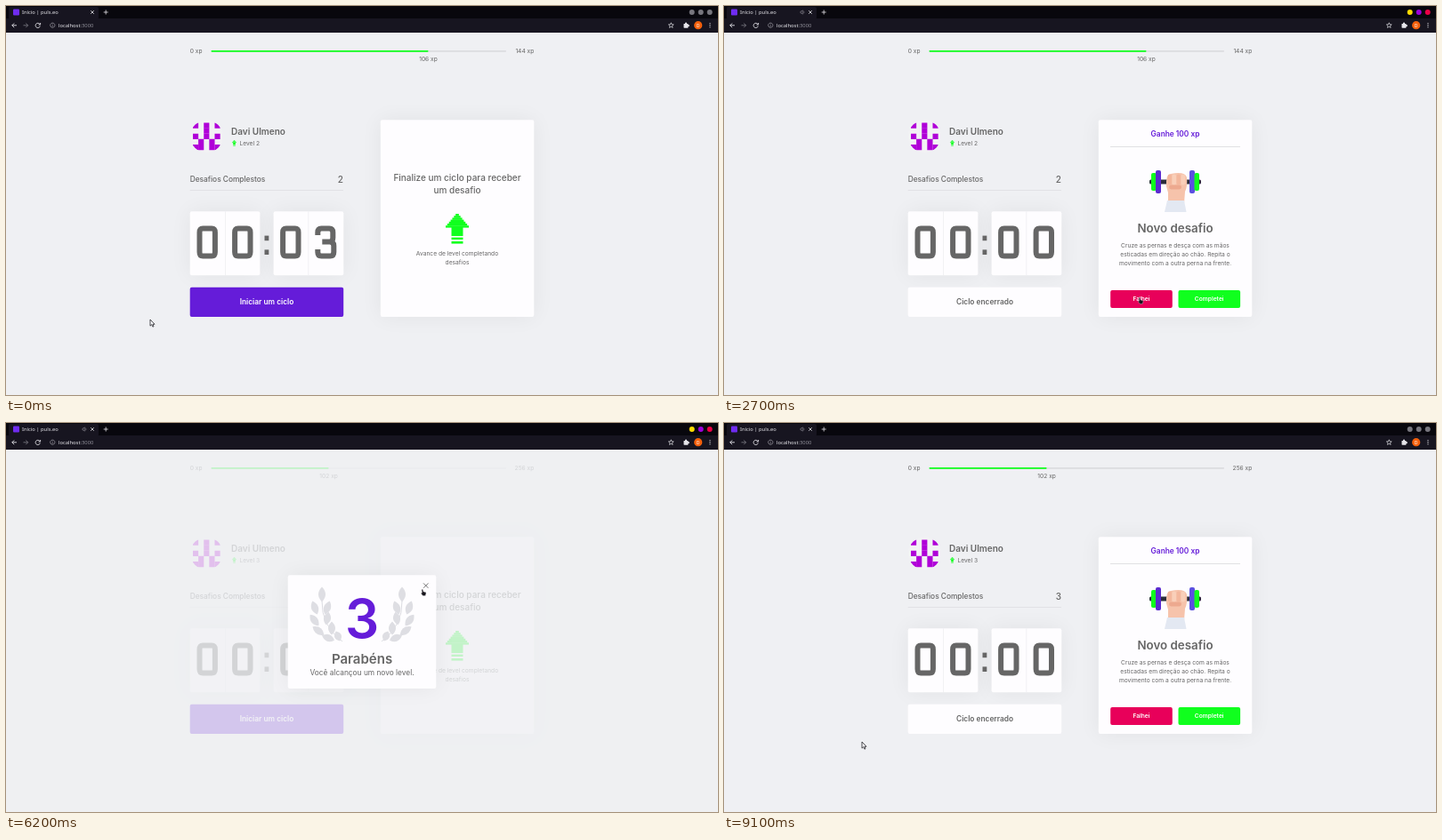
Recreate the animation shown at these times as an HTML page with a canvas. Size 800x438 px, loop 9.2 s.

```html
<!DOCTYPE html>
<html lang="pt-BR">
<head>
<meta charset="utf-8">
<title>Início | puls.eo</title>
<style>
html, body { margin: 0; width: 100%; height: 100%; overflow: hidden; background: #eff0f3; }
canvas { display: block; width: 800px; height: 438px; }
</style>
</head>
<body>
<canvas id="stage" width="800" height="438"></canvas>
<script>
const ctx = document.getElementById('stage').getContext('2d');
const LOOP = 9200, STEP = 100;
const PAGE = '#eff0f3', WHITE = '#fefdff', GREY = '#666666', GREEN = '#10ff1e';
const PURPLE = [101, 28, 217], DEEP = [80, 20, 190], RED = [232, 0, 90], PALE = [254, 253, 255];

// Each cycle: click on start, countdown changes, end of the challenge.
const cycles = [
  { click: 900, ticks: [1200, 1700, 2300], end: 2800, reward: 100 },
  { click: 3560, ticks: [4050, 4550, 5150], end: 5700, reward: 140 },
  { click: 7050, ticks: [7600, 8100, 8700], end: LOOP, reward: 100 }
];
const sounds = [[2500, 4300], [5400, 7700], [8900, LOOP]];
const path = [ // time, x, y of the pointer tip
  [0, 162, 353], [300, 162, 353], [800, 350, 327], [1500, 350, 327], [1700, 377, 319],
  [2100, 466, 328], [2800, 466, 328], [3300, 349, 325], [3700, 349, 325], [4300, 512, 328],
  [4800, 512, 328], [5100, 532, 328], [5500, 545, 327], [5800, 545, 327], [6200, 467, 187],
  [6700, 467, 187], [7000, 349, 330], [8200, 349, 330], [8800, 166, 356], [9100, 155, 359]
];

const rgb = c => `rgb(${c.map(Math.round).join()})`;
const mix = (a, b, k) => a.map((v, i) => v + (b[i] - v) * k);
const clamp = v => Math.max(0, Math.min(1, v));
const within = (t, [a, b]) => t >= a && t < b;

function rect(x, y, w, h, color, r = 0) {
  ctx.fillStyle = color;
  ctx.beginPath();
  ctx.roundRect(x, y, w, h, r);
  ctx.fill();
}
function circle(x, y, r, color) {
  ctx.fillStyle = color;
  ctx.beginPath();
  ctx.arc(x, y, r, 0, 7);
  ctx.fill();
}
function stroke(d, color, width) {
  ctx.strokeStyle = color;
  ctx.lineWidth = width;
  ctx.stroke(new Path2D(d));
}
function text(s, x, y, size, weight = 400, color = GREY, align = 'left', font = 'Inter') {
  ctx.font = `${weight} ${size}px ${font}, sans-serif`;
  ctx.fillStyle = color;
  ctx.textAlign = align;
  ctx.fillText(s, x, y + size * 0.36);
}
function panel(x, y, w, h) {
  ctx.save();
  ctx.shadowColor = 'rgba(0,0,0,.06)';
  ctx.shadowBlur = 25;
  rect(x, y, w, h, WHITE, 2);
  ctx.restore();
}

function browser(t) {
  const active = within(t, [900, 9000]);
  rect(0, 0, 800, 14, '#08070d');
  rect(3, 1, 101, 14, '#171520', 2);
  rect(0, 14, 800, 16, '#171520');
  rect(8, 3.5, 7, 7, '#6f2cf0', 1);
  text('Início | puls.eo', 18, 7, 5.8, 400, '#e6e5ea', 'left', '"Noto Sans"');
  if (sounds.some(s => within(t, s))) {
    stroke('M86 6h1l1.3-1.2v4.4L87 8h-1z M89.5 5.6q1 1.4 0 2.8', '#8d8c96', .6);
  }
  stroke('M95.2 5.2l3.6 3.6m0-3.6l-3.6 3.6 M109.7 7h5m-2.5-2.5v5', '#e6e5ea', .8);
  const dots = active ? ['#ffdc00', '#9c00dc', '#eb0046'] : ['#77767e', '#77767e', '#77767e'];
  dots.forEach((c, i) => circle(770.7 + i * 10, 7, 3, c));
  stroke('M12 21.8H6.8m2.4-2.4l-2.4 2.4 2.4 2.4', '#e6e5ea', .9);
  stroke('M19.5 21.8h5.2m-2.4-2.4l2.4 2.4-2.4 2.4', '#75747d', .9);
  stroke('M37.8 20.3a2.6 2.6 0 1 0 .5 2.2 M38.6 19v2h-2', '#e6e5ea', .9);
  stroke('M52.3 19.1a2.6 2.6 0 1 0 .01 0 M52.3 21.5v1.8m0-2.9v.5', '#b9b8c0', .6);
  text('localhost', 59, 21.7, 5.8, 400, '#ecebf0', 'left', '"Noto Sans"');
  text(':3000', 59 + ctx.measureText('localhost').width, 21.7, 5.8, 400, '#92919a', 'left', '"Noto Sans"');
  stroke('M747.3 18.8l.8 2 2.1.1-1.6 1.4.5 2.1-1.8-1.1-1.8 1.1.5-2.1-1.6-1.4 2.1-.1z', '#e6e5ea', .7);
  rect(761.5, 20, 5, 4.7, '#e6e5ea', .6);
  circle(764, 19.7, 1.1, '#e6e5ea');
  circle(766.8, 22.2, 1.1, '#e6e5ea');
  circle(777.7, 21.7, 4.6, '#f4600c');
  text('D', 777.7, 21.7, 5.2, 400, '#fff', 'center', 'Roboto');
  for (let i = -1; i < 2; i++) circle(791, 21.7 + i * 2.1, .65, '#e6e5ea');
}

function levelArrow(x, y, s) {
  for (let i = 0; i < 7; i++) rect(x - (i + 1) * 1.86 * s, y + i * 2.2 * s, (i + 1) * 3.72 * s, 2.4 * s, GREEN);
  rect(x - 6.5 * s, y + 15 * s, 13 * s, 10 * s, GREEN);
  rect(x - 6.5 * s, y + 26.6 * s, 13 * s, 2.4 * s, GREEN);
  rect(x - 6.5 * s, y + 31 * s, 13 * s, 2.6 * s, GREEN);
}

function profile(level, done) {
  ctx.save();
  ctx.beginPath();
  ctx.arc(225.3, 146.8, 18.3, 0, 7);
  ctx.clip();
  rect(206, 128, 39, 38, '#f2f2f4');
  ['10101', '00100', '10101', '01010', '11011'].forEach((row, j) =>
    [...row].forEach((on, i) => {
      if (+on) rect(210 + i * 6.12, 131.5 + j * 6.12, 6.15, 6.15, '#b000d8');
    }));
  ctx.restore();
  text('Davi Ulmeno', 253, 141.3, 10, 600);
  levelArrow(256.5, 151, .2);
  text('Level ' + level, 262.5, 155, 6.67);
  text('Desafios Complestos', 206.7, 195, 8.33, 500);
  text(done, 379, 195, 10, 500, GREY, 'right');
  rect(206.7, 207.2, 172.3, .6, '#d3d4d8');
}

function experience(xp, goal) {
  text('0 xp', 206.7, 51, 6.67);
  text(goal + ' xp', 593.3, 51, 6.67, 400, GREY, 'right');
  rect(230.5, 50, 331.5, 1.7, '#dcdde0', .8);
  const w = 331.5 * xp / goal;
  rect(230.5, 50, w, 1.7, GREEN, .8);
  text(xp + ' xp', 230.5 + w, 59.3, 6.67, 400, GREY, 'center');
}

const glyphs = {
  0: 'M-5 -15.5H5Q8.7 -15.5 8.7 -11V11Q8.7 15.5 5 15.5H-5Q-8.7 15.5 -8.7 11V-11Q-8.7 -15.5 -5 -15.5Z',
  1: 'M-7 -10.5L2 -15.8V18.5',
  2: 'M-8.5 -8V-11Q-8.5 -15.5 -4.5 -15.5H4.5Q8.5 -15.5 8.5 -11V-7Q8.5 -4 6.5 -1.5L-7.5 15.5H11.5',
  3: 'M-9 -8V-11Q-9 -15.5 -5 -15.5H4Q8 -15.5 8 -11V-5Q8 -.5 4 -.5H-4H4.5Q9 -.5 9 4V11Q9 15.5 5 15.5H-5Q-9 15.5 -9 11V8'
};
function countdown(seconds) {
  panel(206.7, 231.3, 78.7, 72);
  panel(300.6, 231.3, 78.7, 72);
  rect(246, 231.3, .7, 72, '#ebebef');
  rect(339.5, 231.3, .7, 72, '#ebebef');
  [[226.2, 0], [265.8, 0], [319.8, 0], [359.3, seconds]].forEach(([x, n]) => {
    ctx.save();
    ctx.translate(x, 266);
    stroke(glyphs[n], GREY, 6);
    ctx.restore();
  });
  rect(290.5, 258.6, 4.8, 5.6, GREY);
  rect(290.5, 274.4, 4.8, 5.6, GREY);
}

function mainButton(t, cycle, mode, hover) {
  const box = [206.7, 316.7, 172.5, 33.3, 2];
  let label = 'Iniciar um ciclo', color = hover ? DEEP : PURPLE, ink = '#fff';
  if (mode === 'run') {
    const goal = hover ? RED : PALE;
    label = 'Abandonar ciclo';
    color = mix(DEEP, goal, clamp((t - cycle.click) / 200));
    if (!hover) ink = GREY;
  } else if (mode === 'challenge') {
    label = 'Ciclo encerrado';
    color = PALE;
    ink = GREY;
  }
  rect(...box.slice(0, 4), rgb(color), box[4]);
  if (mode === 'run') {
    ctx.strokeStyle = '#101014';
    ctx.lineWidth = 1.2;
    ctx.beginPath();
    ctx.roundRect(...box);
    ctx.stroke();
  }
  text(label, 293, 333.4, 8.33, 600, ink, 'center');
}

function dumbbell() {
  rect(478, 195.5, 58, 5, '#2b2d3a', 1.5);
  rect(480, 188, 6, 20, GREEN, 2);
  rect(485, 185, 6, 26, '#5b2bd0', 2);
  rect(523, 185, 6, 26, '#5b50e0', 2);
  rect(528.5, 188, 5.5, 20, GREEN, 2);
  ctx.fillStyle = '#f6c3ab';
  ctx.fill(new Path2D('M497 203Q496 190 502 189Q518 186 520 193Q521 203 518 209L517 222H499V210Z'));
  for (let i = 0; i < 4; i++) rect(498.5 + i * 5, 189.5, 4.6, 12, i % 2 ? '#f9cfb9' : '#f3b79d', 2.2);
  rect(500, 201.5, 14, 5, '#eda98f', 2.4);
  ctx.fillStyle = '#e3e8f2';
  ctx.fill(new Path2D('M498 219H517L519.5 232H495Z'));
}

function card(cycle, mode) {
  panel(420.8, 128.3, 172.5, 221.7);
  if (mode !== 'challenge') {
    text('Finalize um ciclo para receber', 507, 193.6, 10, 500, GREY, 'center');
    text('um desafio', 507, 207.6, 10, 500, GREY, 'center');
    levelArrow(507, 234, 1);
    text('Avance de level completando', 507, 279, 6.67, 400, GREY, 'center');
    text('desafios', 507, 288.3, 6.67, 400, GREY, 'center');
    return;
  }
  text(`Ganhe ${cycle.reward} xp`, 507, 143.6, 8.33, 600, rgb(PURPLE), 'center');
  rect(434, 158.2, 146, .7, '#d7d8da');
  dumbbell();
  text('Novo desafio', 507, 249.8, 13.33, 600, GREY, 'center');
  ['Cruze as pernas e desça com as mãos', 'esticadas em direção ao chão. Repita o',
    'movimento com a outra perna na frente.'].forEach((line, i) =>
    text(line, 507, 269.6 + i * 10, 6.67, 400, GREY, 'center'));
  rect(434.2, 320, 69.6, 20, rgb(RED), 2);
  rect(510.5, 320, 69.6, 20, GREEN, 2);
  text('Falhei', 469, 330, 6.67, 600, '#fff', 'center');
  text('Completei', 545.2, 330, 6.67, 600, '#fff', 'center');
}

// Leaf: centre, half length, angle from vertical; drawn on both sides.
const leaves = [[355, 193, 8.5, 0], [347, 208, 8, -.35], [361, 208, 8, .35], [346.5, 222, 8, -.65],
  [361, 220, 7.5, .2], [351, 234, 8, -.95], [366, 231, 7.5, 0], [362, 242, 7.5, -1.2], [373, 240, 6, -.4]];
function laurel() {
  for (const side of [1, -1]) {
    ctx.save();
    ctx.translate(400, 0);
    ctx.scale(side, 1);
    ctx.translate(-400, 0);
    stroke('M355 200Q354 228 378 246', '#d9d9de', .9);
    for (const [x, y, r, angle] of leaves) {
      ctx.save();
      ctx.translate(x, y);
      ctx.rotate(angle);
      ctx.fillStyle = '#dedee3';
      ctx.fill(new Path2D(`M0 ${-r}Q8 0 0 ${r}Q-8 0 0 ${-r}Z`));
      ctx.restore();
    }
    ctx.restore();
  }
}
function levelModal() {
  ctx.globalAlpha = .8;
  rect(0, 30, 800, 408, PAGE);
  ctx.globalAlpha = 1;
  panel(316.7, 171.3, 166.6, 127.7);
  laurel();
  text('3', 400, 220.5, 60, 600, rgb(PURPLE), 'center');
  text('Parabéns', 400, 265.2, 15, 600, GREY, 'center');
  text('Você alcançou um novo level.', 400, 280.8, 8.33, 400, GREY, 'center');
  stroke('M469 180.4l5.4 5.4m0-5.4l-5.4 5.4', GREY, .9);
}

function pointerAt(t) {
  const i = Math.max(1, path.findIndex(p => p[0] >= t));
  const [a, b] = [path[i - 1], path[i]];
  const k = clamp((t - a[0]) / (b[0] - a[0]));
  const e = k * k * (3 - 2 * k);
  return [a[1] + (b[1] - a[1]) * e, a[2] + (b[2] - a[2]) * e];
}
function pointer(x, y, hand) {
  ctx.save();
  ctx.translate(x, y);
  ctx.lineJoin = 'round';
  const shape = new Path2D(hand
    ? 'M0 .8Q.8 -.2 1.5 .8L2 3L4.5 3.4Q5.2 4 4.8 5.6L4.2 7.4H1.4L-.6 5Q-.7 4 .5 4.2Z'
    : 'M0 0V7.2L1.7 5.7L2.9 8.2L4 7.7L2.9 5.3H5Z');
  ctx.fillStyle = hand ? '#15131a' : '#f8f8fa';
  ctx.strokeStyle = hand ? '#d8d6dc' : '#222228';
  ctx.lineWidth = hand ? .4 : .8;
  ctx.fill(shape);
  ctx.stroke(shape);
  ctx.restore();
}

function draw(t) {
  const cycle = cycles.find(c => t < c.end);
  const passed = cycle.ticks.filter(at => t >= at).length;
  const mode = t < cycle.click ? 'idle' : passed < 3 ? 'run' : 'challenge';
  const levelled = t >= cycles[1].end;
  const [x, y] = pointerAt(t);
  const hover = x > 206 && x < 380 && y > 316 && y < 350;

  rect(0, 0, 800, 438, PAGE);
  experience(...(levelled ? [102, 256] : [106, 144]));
  profile(levelled ? 3 : 2, levelled ? 3 : 2);
  countdown(3 - passed);
  mainButton(t, cycle, mode, hover);
  card(cycle, mode);
  if (within(t, [5800, 6700])) levelModal();
  browser(t);
  pointer(x, y, hover || within(t, [1500, 7200]));
}

function frame(now) {
  draw(Math.floor(now % LOOP / STEP) * STEP);
  requestAnimationFrame(frame);
}
requestAnimationFrame(frame);
</script>
</body>
</html>
```
